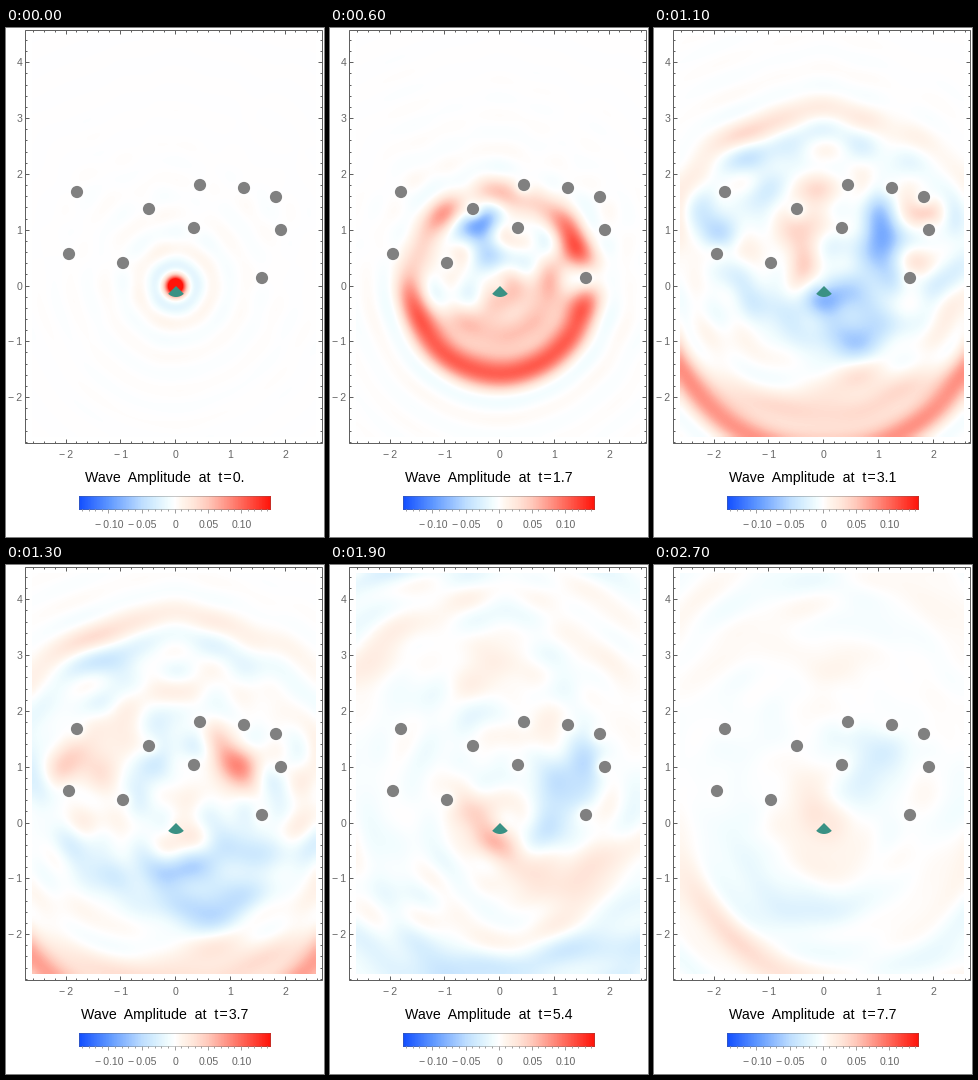
Recreate the animation shown at these times as a matplotlib script. Size 318 by 509 pixels, loop 2.8 s.

```python
import math

import numpy as np
import matplotlib.pyplot as plt
from matplotlib.animation import FuncAnimation
from matplotlib.collections import LineCollection
from matplotlib.colors import LinearSegmentedColormap
from matplotlib.patches import Circle, Rectangle, Wedge

W, H, DPI = 318, 509, 64
PT = 72 / DPI                        # points per pixel
FRAMES, INTERVAL, DT = 28, 100, 0.284
X0, Y0, SX, SY = 169.5, 258.0, 54.75, 55.83
LEFT, TOP, RIGHT, BOTTOM = 26, 8, 310, 409
FRAME = (19, 2, 316, 415)
FONTS = ["Liberation Sans", "DejaVu Sans"]
GRAY = "#606060"
LIMIT = 0.1445
RADIUS = 0.1
K_MAX, K_COUNT = 10.5, 84
GAIN, TAPER = 0.84, 0.4
ORDERS = (-1, 0, 1)

DOTS = [(71, 164), (63, 226), (117, 235), (143, 181), (194, 157),
        (188, 200), (238, 160), (270, 169), (275, 202), (256, 250)]

STOPS = [(-LIMIT, "#1450ff"), (-0.10, "#5f98ff"), (-0.05, "#bedeff"),
         (-0.03, "#d7effe"), (-0.01, "#f2fdff"), (0, "#ffffff"),
         (0.01, "#fff6ee"), (0.03, "#ffe4d8"), (0.05, "#ffc9bb"),
         (0.10, "#ff6a5c"), (LIMIT, "#ff140a")]
CMAP = LinearSegmentedColormap.from_list(
    "wave", [((v + LIMIT) / (2 * LIMIT), c) for v, c in STOPS])


def to_data(px, py):
    return (np.asarray(px) - X0) / SX, (Y0 - np.asarray(py)) / SY


# Hankel functions: smooth envelopes are tabulated from their integral form
TABLE_X = np.geomspace(0.001, 110, 3000)


def envelope(n):
    step = 0.02
    s = (np.arange(260) + 0.5) * step
    core = (1 + 0.5j * s ** 2 / TABLE_X[:, None]) ** (n - 0.5)
    total = (core * np.exp(-s ** 2) * s ** (2 * n)).sum(axis=1) * step
    phase = np.exp(-1j * math.pi * (n / 2 + 0.25))
    return (np.sqrt(2 / (math.pi * TABLE_X)) * phase
            * 2 / math.gamma(n + 0.5) * total)


ENVELOPES = [envelope(n) for n in range(3)]


def hankel(n, x):
    sign = -1 if n < 0 and n % 2 else 1
    return sign * np.interp(x, TABLE_X, ENVELOPES[abs(n)]) * np.exp(1j * x)


def scatter_coefficients(k, pos):
    """Outgoing multipole strengths of all soft cylinders at wavenumber k."""
    count = len(pos)
    shift = pos[:, None] - pos[None, :]          # [receiver, emitter]
    dist = np.abs(shift) + np.eye(count)
    turn = np.angle(shift)
    coupling = {}
    for d in range(-2, 3):
        block = hankel(d, k * dist) * np.exp(1j * d * turn)
        np.fill_diagonal(block, 0)
        coupling[d] = block

    size = count * len(ORDERS)
    system = np.eye(size, dtype=complex)
    drive = np.zeros(size, dtype=complex)
    for a, n in enumerate(ORDERS):
        rows = slice(a * count, (a + 1) * count)
        h = hankel(abs(n), k * RADIUS)
        t = -h.real / h
        drive[rows] = (t * 0.25j * hankel(-n, k * np.abs(pos))
                       * np.exp(-1j * n * np.angle(pos)))
        for b, m in enumerate(ORDERS):
            cols = slice(b * count, (b + 1) * count)
            system[rows, cols] -= t * coupling[m - n]
    return np.linalg.solve(system, drive).reshape(len(ORDERS), count)


def wave_frames():
    """Pulse from the origin, built up from a tapered band of wavenumbers."""
    nx, ny = 95, 134
    px = LEFT + (np.arange(nx) + 0.5) * (RIGHT - LEFT) / nx
    py = TOP + (np.arange(ny) + 0.5) * (BOTTOM - TOP) / ny
    gx, gy = to_data(*np.meshgrid(px, py))
    grid = (gx + 1j * gy).ravel()
    dx, dy = to_data(*zip(*DOTS))
    pos = dx + 1j * dy

    source_r = np.maximum(np.abs(grid), 0.03)
    dot_r = [np.maximum(np.abs(grid - p), RADIUS) for p in pos]
    dot_turn = [np.exp(1j * np.angle(grid - p)) for p in pos]

    dk = K_MAX / K_COUNT
    ks = (np.arange(K_COUNT) + 0.5) * dk
    weights = GAIN * (1 - TAPER * (ks / K_MAX) ** 2) * dk / (2 * math.pi)
    modes = np.empty((K_COUNT, grid.size), dtype=complex)
    for i, k in enumerate(ks):
        field = 0.25j * hankel(0, k * source_r)
        minus, zero, plus = scatter_coefficients(k, pos)
        for j, r in enumerate(dot_r):
            field += zero[j] * hankel(0, k * r)
            field += hankel(1, k * r) * (plus[j] * dot_turn[j]
                                         - minus[j] * dot_turn[j].conj())
        modes[i] = field * weights[i]

    times = DT * np.arange(FRAMES)
    waves = np.exp(-1j * np.outer(times, ks)) @ modes
    return waves.real.reshape(FRAMES, ny, nx)


def lines(ax, segments, color):
    ax.add_collection(LineCollection(segments, colors=color,
                                     linewidths=PT, zorder=4))


def label(ax, x, y, text, ha="center"):
    ax.text(x, y, text.replace("-", "\u2212\u2009"), ha=ha,
            va="center_baseline", fontsize=10.5 * PT, color="#666666",
            family=FONTS)


def draw_axes(ax):
    x1, y1, x2, y2 = FRAME
    ax.add_patch(Rectangle((x1, y1), x2 - x1, y2 - y1, fill=False,
                           edgecolor=GRAY, linewidth=PT, zorder=4))
    # line positions name whole pixels, so they sit half a pixel lower
    ticks = []
    for i in range(-13, 14):
        x, size = X0 + i * SX / 5, 4 if i % 5 == 0 else 2
        ticks += [[(x - 0.5, y1), (x - 0.5, y1 + size)],
                  [(x - 0.5, y2), (x - 0.5, y2 - size)]]
        if i % 5 == 0:
            label(ax, x, 425.5, str(i // 5))
    for i in range(-14, 23):
        y, size = Y0 - i * SY / 5, 4 if i % 5 == 0 else 2
        ticks += [[(x1, y - 0.5), (x1 + size, y - 0.5)],
                  [(x2, y - 0.5), (x2 - size, y - 0.5)]]
        if i % 5 == 0:
            label(ax, 16.5, y - 0.5, str(i // 5), "right")
    lines(ax, ticks, GRAY)


def draw_legend(ax):
    ax.imshow(np.linspace(-LIMIT, LIMIT, 256)[None, :], cmap=CMAP,
              vmin=-LIMIT, vmax=LIMIT, extent=(73, 265, 482, 468),
              aspect="auto", interpolation="bilinear")
    ax.add_patch(Rectangle((73, 468), 191, 13, fill=False, edgecolor=GRAY,
                           alpha=0.35, linewidth=PT, zorder=4))
    ticks = []
    for i in range(-14, 15):
        x = 169.2 + i * 6.62
        ticks.append([(x - 0.5, 481), (x - 0.5, 485 if i % 5 == 0 else 483)])
        if i % 5 == 0:
            label(ax, x, 495.5, f"{i / 100:.2f}" if i else "0")
    lines(ax, ticks, "#a0a0a0")


fig = plt.figure(figsize=(W / DPI, H / DPI), dpi=DPI, facecolor="white")
ax = fig.add_axes([0, 0, 1, 1])
ax.axis("off")

fields = wave_frames()
image = ax.imshow(fields[0], cmap=CMAP, vmin=-LIMIT, vmax=LIMIT,
                  extent=(LEFT, RIGHT, BOTTOM, TOP), aspect="auto",
                  interpolation="bicubic", interpolation_stage="data")
draw_axes(ax)
draw_legend(ax)
for x, y in DOTS:
    ax.add_patch(Circle((x, y), 6.1, color="#808080", linewidth=0, zorder=5))
ax.add_patch(Wedge((170, 258), 11, 45, 135, color="#3a9184",
                   linewidth=0, zorder=5))
title = ax.text(159, 454, "", ha="center", va="baseline", color="black",
                fontsize=14.1 * PT, family=FONTS)
ax.set_xlim(0, W)
ax.set_ylim(H, 0)


def draw(i):
    image.set_data(fields[i])
    clock = f"{i * DT:.1f}".rstrip("0")
    title.set_text(f"Wave  Amplitude  at  t\u200a=\u200a{clock}")
    return image, title


anim = FuncAnimation(fig, draw, frames=FRAMES, interval=INTERVAL,
                     repeat=True, repeat_delay=0, blit=False)
plt.show()
```
